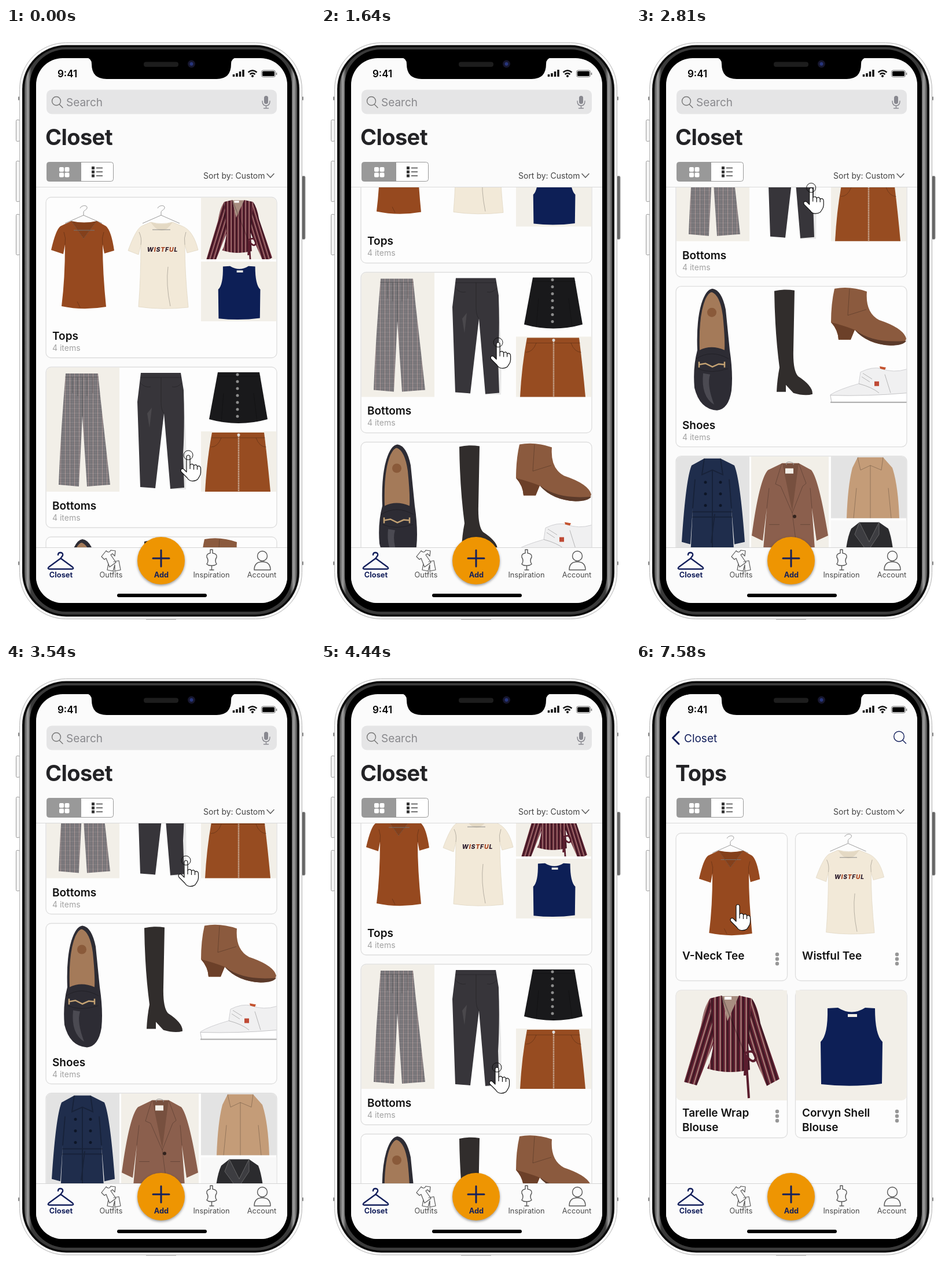
An HTML page for the animation above (8 s loop, 534x1049 px).

```html
<!DOCTYPE html>
<html lang="en">
<head>
<meta charset="utf-8">
<title>Closet</title>
<style>
  html, body { margin: 0; width: 100%; height: 100%; overflow: hidden; background: #fff; }
  svg { display: block; width: 100vw; height: 100vh; font-family: Inter, sans-serif; }
  .title { font-size: 38px; font-weight: 700; letter-spacing: -.6px; fill: #232326; }
  .head { font-size: 19px; font-weight: 600; fill: #111; }
  .sub { font-size: 14px; fill: #a2a2a2; }
  .field { font-size: 19px; }
  .tab { font-size: 12.8px; fill: #4a4a4a; text-anchor: middle; }
  .on { font-weight: 700; fill: #14205c; }
  .line { fill: none; stroke: #555; stroke-width: 1.4; stroke-linecap: round; stroke-linejoin: round; }
  .navy { stroke: #14205c; }
  .print { font-size: 10.5px; font-weight: 800; font-style: italic; letter-spacing: .8px; text-anchor: middle; fill: #2b1c2c; }
  .print tspan { fill: #a8401c; }
  .sand { fill: #f2efe8; }
  .fold { fill: none; stroke: #000; stroke-opacity: .25; }
  .card { fill: #fdfdfd; stroke: #dedede; stroke-width: 1.3; }
</style>
</head>
<body>
<svg viewBox="0 0 534 1049" preserveAspectRatio="none">
<defs>
  <clipPath id="screen"><rect x="52" y="52" width="434" height="940" rx="46"/></clipPath>
  <clipPath id="list"><rect x="52" y="275" width="434" height="621"/></clipPath>
  <clipPath id="inCard"><rect x="69.5" y=".5" width="398" height="276" rx="9"/></clipPath>
  <clipPath id="topCell"><rect x="337" y="0" width="131" height="107"/></clipPath>
  <clipPath id="inSmall"><rect x="69" y="563" width="399" height="190" rx="9"/></clipPath>
  <linearGradient id="metal" x2="1" y2="0">
    <stop stop-color="#4c4c4c"/><stop offset=".012" stop-color="#a0a0a0"/><stop offset=".025" stop-color="#3a3a3a"/>
    <stop offset=".975" stop-color="#3a3a3a"/><stop offset=".988" stop-color="#a0a0a0"/><stop offset="1" stop-color="#4c4c4c"/>
  </linearGradient>
  <pattern id="stripe" width="9" height="9" patternUnits="userSpaceOnUse">
    <rect width="9" height="9" fill="#642133"/><path d="M1.5 0V9" stroke="#c0a494" stroke-width="1.5"/><path d="M5.5 0V9" stroke="#32161f" stroke-width="2"/>
  </pattern>
  <pattern id="stripeL" href="#stripe" patternTransform="rotate(17)"/>
  <pattern id="stripeR" href="#stripe" patternTransform="rotate(-17)"/>
  <pattern id="plaid" width="8" height="8" patternUnits="userSpaceOnUse">
    <rect width="8" height="8" fill="#8b878a"/><path d="M1 0V8M4 0V8M0 2H8M0 5H8" stroke="#68656b" stroke-width=".9"/><path d="M6.5 0V8" stroke="#a58d8d" stroke-width=".8"/>
  </pattern>

  <path id="hanger" d="M102 45L134 31L166 45M134 31V26C134 22 141 22 140 17C139 13 130 14 128 19" fill="none" stroke="#9a9a9a"/>
  <g id="vneck">
    <use href="#hanger"/>
    <path d="M113 41L94 50Q86 56 78 91L99 98L102 82Q102 140 96 188Q133 196 173 189Q167 130 167 82L170 97L187 92Q182 58 173 50L157 41L134 71Z" fill="#96491f"/>
    <path d="M113 41Q135 46 157 41L134 71Z" fill="#84401b"/>
    <path d="M117 57H153" stroke="#777"/>
    <path class="fold" d="M113 41L134 71L157 41M123 180L128 190M102 82Q104 70 100 60M167 82Q165 70 169 60"/>
  </g>
  <g id="printTee">
    <use href="#hanger" x="134"/>
    <path d="M250 43L234 50Q224 56 211 92L229 99L233 82Q233 140 229 189Q270 195 315 190Q309 130 309 82L313 96L332 91Q324 58 305 50L288 43Q269 48 250 43Z" fill="#f2e9d8" stroke="#dfd4bf" stroke-width=".7"/>
    <path d="M250 43Q269 72 288 43Q269 50 250 43Z" fill="#e4d9c4"/>
    <path d="M253 56H284" stroke="#888"/>
    <path class="fold" stroke-opacity=".1" d="M233 82Q235 70 230 60M309 82Q307 70 311 60M280 120Q276 150 284 188"/>
    <text class="print" x="270.5" y="94">W<tspan>I</tspan>S<tspan>T</tspan>F<tspan>U</tspan>L</text>
  </g>
  <g id="wrap">
    <path d="M148 573H178L158 618Z" fill="#a88d80"/><path d="M153 574H165V579H153Z" fill="#fff"/>
    <path d="M128 577Q118 590 112 625L83 721L105 727L136 650Z" fill="url(#stripeL)"/>
    <path d="M200 577Q210 590 215 620L248 716L226 728L192 650Z" fill="url(#stripeR)"/>
    <path d="M148 572L128 577L134 650Q132 680 123 698Q160 709 197 700L194 655L200 577L178 572L158 616Z" fill="url(#stripe)"/>
    <path class="fold" stroke-width="2" d="M148 572L188 672M134 650L128 600M194 655L198 605"/>
    <path d="M188 672Q204 662 207 680Q204 692 190 676L188 710M190 676L195 749" fill="none" stroke="#5a1d2d" stroke-width="4"/>
  </g>
  <g id="shell">
    <path d="M331 594L349 593Q373 608 396 593L413 594Q413 640 426 652L425 724Q373 731 320 725L319 652Q332 640 331 594Z" fill="#0d1f56"/>
    <path d="M366 604H382V609H366Z" fill="#f3f0e8"/>
  </g>
  <g id="frameCard"><rect class="card" x="69" y="0" width="399" height="277" rx="9"/></g>
  <rect id="smallCard" class="card" x="69" y="292" width="192.500" height="254.500" rx="9"/>
  <path id="dots" d="M244 501v0M244 509v0M244 517v0" stroke="#979797" stroke-width="6.400" stroke-linecap="round"/>

  <g id="tools">
    <text x="89" y="84.500" font-size="17" font-weight="600">9:41</text>
    <path d="M393.500 84V80M399 84V78M404.500 84V75M410 84V72" stroke="#111" stroke-width="3.500"/>
    <path d="M418.500 76.500Q426 70 433.500 76.500M421.500 80Q426 76 430.500 80" fill="none" stroke="#111" stroke-width="2.400"/><circle cx="426" cy="83" r="2"/>
    <rect x="441.500" y="73" width="24" height="11.500" rx="3" fill="none" stroke="#777"/><rect x="443" y="74.500" width="21" height="8.500" rx="1.500"/><path d="M467.500 77V81" stroke="#777" stroke-width="1.500"/>
    <rect x="70.500" y="231.500" width="115" height="33" rx="4" fill="#fff" stroke="#999"/>
    <path d="M130 231.500H74.500Q70.500 231.500 70.500 235.500V260.500Q70.500 264.500 74.500 264.500H130Z" fill="#999"/>
    <g fill="#fff"><rect x="92" y="240" width="8" height="8" rx="2"/><rect x="101.500" y="240" width="8" height="8" rx="2"/><rect x="92" y="249.500" width="8" height="8" rx="2"/><rect x="101.500" y="249.500" width="8" height="8" rx="2"/></g>
    <path d="M150.500 239V257.500" stroke="#333" stroke-width="5" stroke-dasharray="5 1.800"/><path d="M156 241.500H167M156 248.300H167M156 255H167" stroke="#444" stroke-width="1.500"/>
    <text x="341" y="259.500" font-size="14" fill="#444">Sort by: Custom</text>
    <path class="line" d="M451 251.500L457 258L463 251.500"/>
    <path d="M52 274.500H486" stroke="#d9d9d9"/>
  </g>
  <g id="tabs">
    <path d="M52 896H486V992H52Z" fill="#fbfbfb"/><path d="M52 896.500H486" stroke="#d5d5d5"/>
    <path class="line navy" stroke-width="2.600" style="stroke-width:2.4" d="M90 909Q90 905 94.500 905Q99 906 98 910L94.500 915L74 930Q71 933 75 933.500H114Q118 933 115 930L94.500 915"/>
    <path class="line" style="stroke-width:1.200" d="M173 902L165 912L170 917L173 915L179 930L190 922L181 909L184 907L188 911L189 902L181 901Q178 907 173 902ZM177 924L175 935L185 937L188 926L188 937L198 935L195 919L186 921"/>
    <path class="line" d="M353 900H357V906Q365 907 364 913Q360 919 364 925Q360 928 355.500 927.500Q350 928 347 925Q351 919 347 913Q346 907 353 906ZM355.500 928V934M352 935H359"/>
    <circle class="line" cx="443" cy="911" r="8.500"/><path class="line" d="M429 935Q429 921 443 921Q457 921 457 935Z"/>
    <circle cx="268" cy="919" r="41" fill="#ee9502" style="filter:drop-shadow(0 2px 2px #0006)"/>
    <path class="line navy" style="stroke-width:3" d="M254 915H282M268 901V929"/>
    <text class="tab on" x="95" y="948">Closet</text><text class="tab" x="181.500" y="948">Outfits</text><text class="tab on" x="268.500" y="948">Add</text>
    <text class="tab" x="355" y="948">Inspiration</text><text class="tab" x="442" y="948">Account</text>
    <rect x="192" y="976" width="155" height="6" rx="3"/>
  </g>
</defs>

<g id="body">
  <g fill="#f4f4f4" stroke="#999"><rect x="17.500" y="158.500" width="6" height="37" rx="2"/><rect x="17.500" y="229.500" width="6" height="70" rx="2"/><rect x="17.500" y="321.500" width="6" height="70" rx="2"/><rect x="511.500" y="255.500" width="5.500" height="109" rx="2" fill="#666"/></g>
  <path d="M21 121.500H30M505 121.500H514M21 923.500H30M505 923.500H514" stroke="#888" stroke-width="6"/>
  <path d="M242 1019.500H294" stroke="#777" stroke-width="2"/>
  <rect x="23.500" y="25.500" width="488" height="994" rx="80" fill="#fafafa" stroke="#b5b5b5"/>
  <rect x="28" y="29.500" width="479" height="986" rx="76" fill="#0a0a0a"/>
  <rect x="32" y="33" width="471" height="979" rx="72" fill="url(#metal)"/>
  <rect x="41" y="37" width="453" height="970" rx="62"/>
</g>

<g clip-path="url(#screen)">
  <path d="M52 52H486V992H52Z" fill="#fbfbfb"/>
  <g id="closet">
    <rect x="70" y="106.500" width="398" height="42" rx="9" fill="#e5e5e6"/>
    <circle class="line" cx="87" cy="126" r="7.500" style="stroke:#777"/><path class="line" style="stroke:#777" d="M92.500 132L98 137.500"/>
    <text class="field" x="104" y="134.500" fill="#88888c">Search</text>
    <rect x="446" y="117" width="7" height="14" rx="3.500" fill="#88888f"/><path class="line" style="stroke:#88888f" d="M443 126Q443 134 449.500 134Q456 134 456 126M449.500 134V138M445.500 138.500H453.500"/>
    <text class="title" x="68" y="202">Closet</text>
    <use href="#tools"/>
    <g clip-path="url(#list)"><g id="scroller">
      <g transform="translate(0 292)">
        <use href="#frameCard"/>
        <g clip-path="url(#inCard)">
          <path class="sand" d="M337 0H468V107H337ZM337 111H468V214H337Z"/>
          <use href="#vneck"/><use href="#printTee"/>
          <g clip-path="url(#topCell)"><use href="#wrap" transform="translate(288.700 -390.600) scale(.691)"/></g>
          <use href="#shell" transform="translate(149.800 -287.500) scale(.68 .685)"/>
        </g>
        <text class="head" x="80" y="246">Tops</text><text class="sub" x="80" y="265">4 items</text>
      </g>
      <g transform="translate(0 585)">
        <use href="#frameCard"/>
        <g clip-path="url(#inCard)">
          <path class="sand" d="M70 0H196V215H70ZM337 111H468V215H337Z"/>
          <path d="M103 11H159L164 60Q172 130 180 203L140 206L132 85L126 206L91 203Q94 120 103 11Z" fill="url(#plaid)"/>
          <path class="fold" d="M102 17H160M115 18V45M124 18V50M140 18V50M150 18V45M132 18V85"/>
          <path d="M302 12Q314 100 311 211L284 211Z" fill="#e8e8e8"/>
          <path d="M233 10H302L307 40Q309 100 306 150L308 208L284 210L273 80L258 209L232 207L227 60Z" fill="#37353a"/>
          <path class="fold" stroke-opacity=".5" d="M232 18H303M268 18V60Q268 75 273 80M233 28Q240 36 250 34M303 28Q296 36 287 34"/>
          <path d="M244 80L252 70L248 105Z" fill="#4a484c"/>
          <path d="M366 9H438L452 90Q402 104 351 90Z" fill="#19191b"/><path class="fold" stroke-opacity=".6" d="M365 16H440M376 45L372 95M428 45L434 95"/>
          <path d="M400 13V90" stroke="#8d8d8d" stroke-width="5" stroke-linecap="round" stroke-dasharray="0 12"/>
          <path d="M356 113H446Q452 160 457 215H344Q347 160 356 113Z" fill="#974c21"/>
          <path class="fold" d="M355 122H448M372 122Q366 138 354 138M432 122Q438 138 450 138"/>
          <path d="M402 119V215" stroke="#cbb09c" stroke-width="2.500" stroke-dasharray="2 1"/><circle cx="402" cy="117" r="2.500" fill="#ddd"/>
        </g>
        <text class="head" x="80" y="246">Bottoms</text><text class="sub" x="80" y="265">4 items</text>
      </g>
      <g transform="translate(0 878)">
        <use href="#frameCard"/>
        <g clip-path="url(#inCard)">
          <path d="M132 4Q148 6 155 40Q158 70 162 110Q168 150 165 180Q160 212 140 214Q110 212 101 175Q98 140 106 110Q104 60 113 30Q121 5 132 4Z" fill="#2d2c34"/>
          <path d="M131 10Q145 15 150 50Q154 90 153 110Q130 100 110 110Q108 50 120 22Q126 10 131 10Z" fill="#a47a59"/>
          <circle cx="131" cy="45" r="8" fill="#8a5a3a"/>
          <path d="M116 150Q112 190 135 204Q122 170 128 152Z" fill="#4b4a52"/>
          <path class="fold" stroke-opacity=".6" d="M104 125Q130 108 160 125M106 142Q130 152 159 142"/>
          <path d="M109 130V140M109 135L120 133L132 139L143 134L153 135M153 130V140" fill="none" stroke="#c4a273" stroke-width="2.500"/>
          <path d="M239 8Q256 4 274 7L272 110Q271 145 280 155Q306 172 305 186Q292 190 272 184L259 170V182H243Q244 160 248 140Q240 80 239 8Z" fill="#312d2c"/>
          <path d="M343 4Q370 -1 399 9Q396 45 420 58Q462 72 467 90Q466 100 440 102Q400 100 378 75L371 92H350Q349 75 337 62Q337 30 343 4Z" fill="#8b5a3e"/>
          <path d="M337 62Q360 68 378 75L371 92H350Q349 75 337 62Z" fill="#6c4029"/><path d="M380 76Q410 99 467 94Q462 102 440 102Q400 100 378 75Z" fill="#5b3a2a"/>
          <path class="fold" d="M369 4L366 50L398 40"/>
          <path d="M336 187Q350 178 385 168L388 148Q408 138 424 142Q445 150 468 143V200H338Z" fill="#f0f0f1" stroke="#cfcfd2"/>
          <path d="M336 188Q400 190 468 184V200H338Z" fill="#fff" stroke="#c4c4c6"/><path d="M336 200H468" stroke="#aaa" stroke-width="2"/>
          <path class="fold" stroke-opacity=".2" d="M385 168Q408 174 420 184M392 150L408 160M390 156L404 165M430 152L440 184"/>
          <path d="M421 138L432 140L430 144L422 142Z" fill="#c4532f"/><path d="M412 164H420V172H412Z" fill="#bf4a35"/>
        </g>
        <text class="head" x="80" y="246">Shoes</text><text class="sub" x="80" y="265">4 items</text>
      </g>
      <g transform="translate(0 1171)">
        <use href="#frameCard"/>
        <g clip-path="url(#inCard)">
          <path d="M70 0H196V215H70ZM337 0H468V107H337Z" fill="#e3e3e3"/><path class="sand" d="M199 0H333V215H199Z"/><path d="M337 111H468V215H337Z" fill="#f8f8f8"/>
          <path d="M118 4H146L170 16Q180 40 188 148L170 152L165 90L172 215H92L98 90L94 152L79 148Q86 40 96 16Z" fill="#1f2d4c"/>
          <path class="fold" stroke-opacity=".5" stroke-width="2" d="M118 4L114 32L132 24L150 32L146 4M132 24V215M98 90L102 40M165 90L161 40M97 96H167M97 105H167M136 100L130 150"/>
          <path d="M120 45V90M146 45V90" stroke="#0d1526" stroke-width="5" stroke-linecap="round" stroke-dasharray="0 20"/>
          <path d="M253 12H281L303 24Q316 40 332 137L312 146L304 90L309 160H220L226 90L219 146L200 137Q213 40 228 24Z" fill="#8b5f4d"/>
          <path d="M253 13H281L270 95Z" fill="#77503f"/><path d="M258 21H272V30H258Z" fill="#f4f0e8"/><path d="M260 15Q258 10 265 10Q274 11 272 15" fill="none" stroke="#999"/>
          <path class="fold" d="M252 12L241 48L250 52L270 98L288 52L294 47L281 12M270 98L278 160M226 90L230 55M304 90L301 55M230 118H248M284 118H301"/><circle cx="274" cy="104" r="3" fill="#33231d"/>
          <path d="M383 2H427L443 20Q453 50 455 107H364Q366 50 374 20Z" fill="#c49c78"/>
          <path class="fold" d="M383 2L388 24L405 16L424 24L427 2M405 16V107M376 107L381 55M441 107L436 55"/>
          <path d="M386 114H420L436 125Q446 150 448 215H360Q360 150 372 125Z" fill="#2b2b2e"/>
          <path d="M386 114L378 135L400 165L420 135L420 114L403 148ZM402 165L408 215" fill="#3d3d41" stroke="#777" stroke-width=".7"/>
        </g>
      </g>
    </g></g>
    <use href="#tabs"/>
  </g>

  <g id="tops">
    <path d="M52 52H486V992H52Z" fill="#fbfbfb"/>
    <path class="line navy" style="stroke-width:3" d="M74 117L63.500 127.500L74 138"/>
    <text class="field" x="83" y="134.500" fill="#14205c">Closet</text>
    <circle class="line navy" cx="454.500" cy="125" r="8.800"/><path class="line navy" d="M461 131.500L466.500 137"/>
    <text class="title" x="68" y="202">Tops</text>
    <use href="#tools"/>
    <use href="#smallCard"/><use href="#smallCard" x="206.500"/><use href="#smallCard" y="271"/><use href="#smallCard" x="206.500" y="271"/>
    <g clip-path="url(#inSmall)"><path class="sand" d="M69.500 563H261V753H69.500ZM276 563H468V753H276Z"/></g>
    <use href="#vneck" transform="translate(33.600 282.500) scale(.966)"/>
    <use href="#printTee" transform="translate(106.500 279.500) scale(.97)"/>
    <use href="#wrap"/><use href="#shell"/>
    <text class="head" x="80" y="509.500">V-Neck Tee</text><text class="head" x="287" y="509.500">Wistful Tee</text>
    <text class="head" x="80" y="781">Tarelle Wrap<tspan x="80" y="806">Blouse</tspan></text>
    <text class="head" x="287" y="781">Corvyn Shell<tspan x="287" y="806">Blouse</tspan></text>
    <use href="#dots"/><use href="#dots" x="207"/><use href="#dots" y="271"/><use href="#dots" x="207" y="271"/>
    <use href="#tabs"/>
  </g>
</g>

<path d="M138 51Q148 52 148 62Q148 88 174 88H364Q389 88 389 62Q389 52 399 51Z"/>
<rect x="238" y="58.500" width="60" height="8.500" rx="4" fill="#1d1d1d"/>
<circle cx="320.500" cy="62" r="6.500" fill="#17172e"/><circle cx="320.500" cy="62" r="3" fill="#27357c"/>

<g id="hand" fill="#fff" stroke="#111" stroke-width="1.200" stroke-linejoin="round">
  <path d="M-3 3A3 3 0 0 1 3 3V17C5 14.500 9 15 9.500 18C12 15.500 15 16.500 15.500 19.500C19 17.500 21.500 19.500 21.500 23V30C21.500 36 18 38 16 42Q12 45 6 44.500Q1 44 -2 39L-12 29C-15 24 -10 22 -7 25L-3 29Z"/>
  <path d="M3 17V24M9.500 18V25M15.500 19.500V25" fill="none"/>
  <circle id="press" r="8" fill="none" stroke-width="1"/>
</g>
</svg>
<script>
const LOOP = 8000;
const ticks = [0, 560, 680, 800, 950, 1070, 1220, 1370, 1490, 1640, 1760, 1880, 2000, 2150, 2300, 2420, 2540,
  2690, 2810, 2930, 3050, 3170, 3540, 3660, 3810, 3930, 4050, 4170, 4290, 4440, 4560, 4710, 4830, 5110,
  5260, 5380, 5500, 5620, 5770, 6300, 6580, 6700, 6820, 7070, 7190, 7310, 7460, 7580];
const handKeys = [[440, 315, 737], [950, 313, 646], [2150, 301, 466], [2930, 303, 241], [3170, 310, 301],
  [3420, 310, 301], [3540, 311, 339], [4440, 304, 696], [4560, 301, 738], [4710, 299, 763], [4830, 298, 773],
  [5110, 298, 773], [5620, 263, 424], [5770, 261, 421], [6950, 261, 421], [7310, 189, 418], [7580, 176, 415]];
const scrollKeys = [[560, 0], [950, 58], [2150, 241.5], [2930, 467], [3420, 467], [3540, 430.5],
  [4440, 67], [4560, 30], [4710, 8], [4830, 0]];
const slideKeys = [[6460, 0], [6580, 150], [6700, 360], [6820, 434]];

const el = id => document.getElementById(id);
const move = (id, x, y) => el(id).setAttribute('transform', `translate(${x} ${y})`);

function sample(keys, t) {
  const i = keys.findIndex(k => k[0] > t);
  if (i === 0) return keys[0].slice(1);
  if (i < 0) return keys[keys.length - 1].slice(1);
  const [a, b] = [keys[i - 1], keys[i]];
  const p = (t - a[0]) / (b[0] - a[0]);
  return a.slice(1).map((v, j) => v + (b[j + 1] - v) * p);
}

function draw(now) {
  const time = now % LOOP;
  const t = ticks.findLast(s => s <= time);
  const [slide] = sample(slideKeys, t);
  move('hand', ...sample(handKeys, t));
  move('scroller', 0, -sample(scrollKeys, t)[0]);
  move('closet', -slide, 0);
  move('tops', 434 - slide, 0);
  const pressed = t < 5110 || (t >= 6300 && t < 6580);
  el('press').setAttribute('visibility', pressed ? 'visible' : 'hidden');
}

const start = performance.now();
function loop() {
  draw(performance.now() - start);
  requestAnimationFrame(loop);
}
loop();
</script>
</body>
</html>
```
